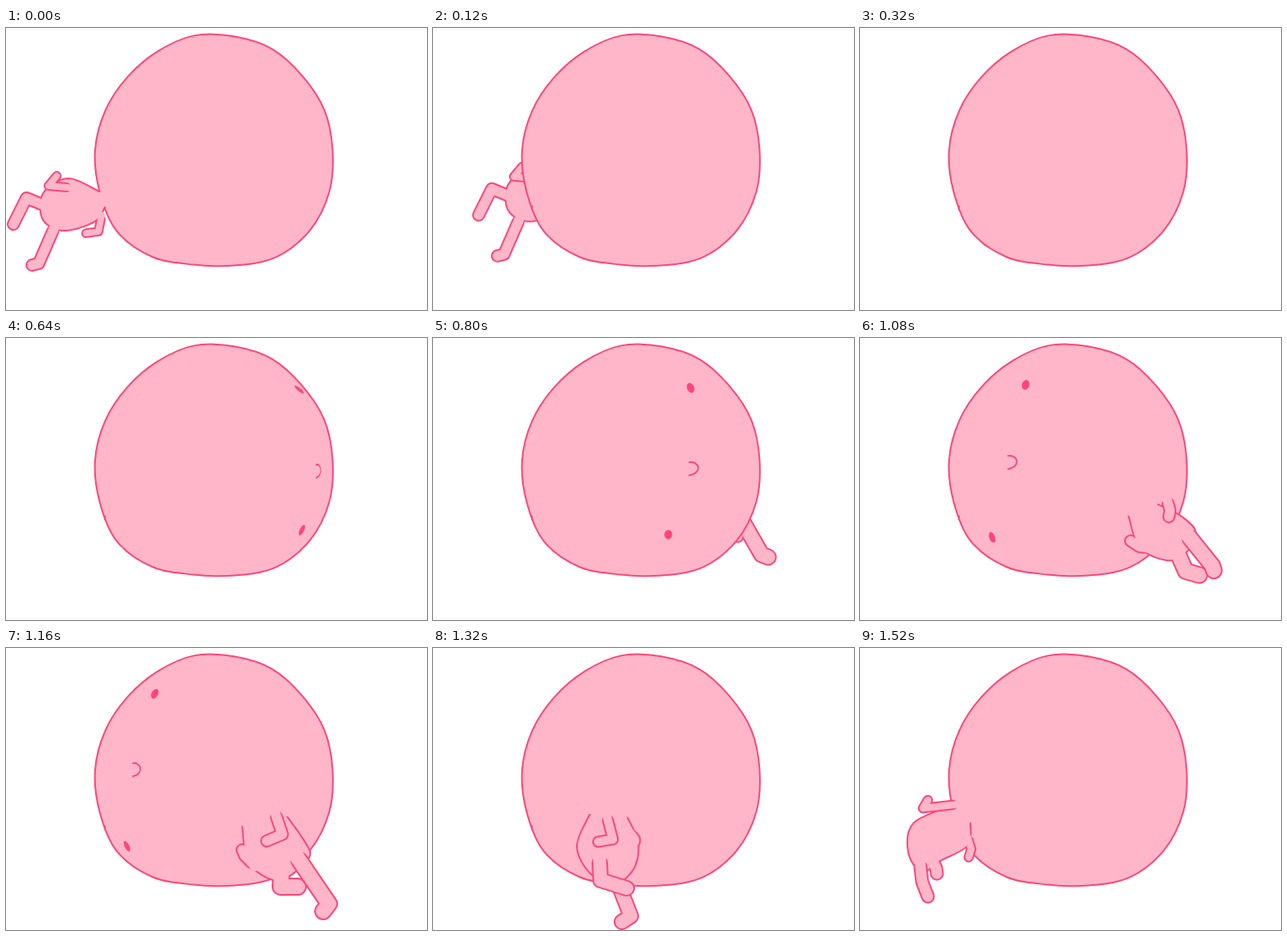
Animation, 515 px wide and 345 px high, one loop 1560 ms. Source, as an HTML page:

```html
<!DOCTYPE html>
<html lang="en">
<head>
<meta charset="utf-8">
<title>Round runner</title>
<style>
  html, body { margin: 0; width: 100%; height: 100%; overflow: hidden; background: #fff; }
  svg { display: block; width: 100vw; height: 100vh; }
  path { stroke-linecap: round; stroke-linejoin: round; }
  .ink { fill: none; stroke: #ff4678; stroke-width: 2; }
  .skin { fill: none; stroke: #ffb6c9; }
  .fill { fill: #ffb6c9; }
  .dot { fill: #ff4678; }
</style>
</head>
<body>
<svg viewBox="0 0 515 345">
  <defs><clipPath id="inside"><path id="clip"/></clipPath></defs>
  <g id="head">
    <path id="ball" class="ink fill"/>
    <path class="ink" d="M121,218V222"/>
    <g id="face" clip-path="url(#inside)">
      <ellipse id="eye1" class="dot"/>
      <ellipse id="eye2" class="dot"/>
      <path id="mouth" class="ink" d="M-5,-8C3,-9 8,-4 7,0C6,4 2,7 -5,8"/>
    </g>
  </g>
  <g id="body"></g>
</svg>
<script>
const LOOP = 1560, STEP = 40, CX = 254.5, CY = 149.2;
const $ = id => document.getElementById(id);
const parse = s => s.split(' ').map(p => p.split(',').map(Number));
const mix = (a, b, k) => Array.isArray(a) ? a.map((v, i) => mix(v, b[i], k)) : a + (b - a) * k;
const set = (el, attrs) => { for (const k in attrs) el.setAttribute(k, attrs[k]); };

// Value at time t from sorted [time, value] keys, carried on past both ends
function at(keys, t) {
  let i = 0;
  while (i < keys.length - 2 && t >= keys[i + 1][0]) i++;
  const [t0, a] = keys[i], [t1, b] = keys[i + 1];
  return mix(a, b, (t - t0) / (t1 - t0));
}

// Smooth curve through the points
function curve(pts, closed) {
  const n = pts.length;
  const get = i => closed ? pts[(i + n) % n] : pts[Math.min(n - 1, Math.max(0, i))];
  let d = 'M' + pts[0];
  for (let i = 0; i < (closed ? n : n - 1); i++) {
    const [p, a, b, q] = [get(i - 1), get(i), get(i + 1), get(i + 2)];
    d += 'C' + [a[0] + (b[0] - p[0]) / 6, a[1] + (b[1] - p[1]) / 6,
      b[0] - (q[0] - a[0]) / 6, b[1] - (q[1] - a[1]) / 6, ...b];
  }
  return d;
}

// Point moved a distance towards another one
function toward([x, y], [tx, ty], dist) {
  const r = Math.hypot(tx - x, ty - y) || 1;
  return [x + (tx - x) / r * dist, y + (ty - y) / r * dist];
}

// Ball: one radius every 20 degrees
const RADII = [145, 150, 153, 151.5, 143.5, 142.5, 151, 155, 149, 145.5, 141.5, 138.5, 139, 142, 141, 142.5, 141, 143.5];
const ball = curve(RADII.map((r, i) => {
  const a = i * Math.PI / 9;
  return [CX + r * Math.cos(a), CY + r * Math.sin(a)];
}), true);
set($('ball'), { d: ball });
set($('clip'), { d: ball });

// Face: each feature turns about the upright axis; keys are [degrees, y]
const turn = (...v) => [800, 960, 1160].map((t, i) => [t, v[i]]);
const EYE1 = turn([34.8, 61], [-8.3, 59], [-42.3, 56]);
const EYE2 = turn([16.7, 240.5], [-32.8, 246], [-64, 242.5]);
const MOUTH = turn([26, 160], [-9, 157], [-40.6, 149]);

function place(keys, radius, t) {
  const [deg, y] = at(keys, t), a = deg * Math.PI / 180;
  return { deg, y, x: 254 + radius * Math.sin(a), cos: Math.cos(a), sin: Math.sin(a) };
}

function drawEye(el, keys, radius, lean, t) {
  const p = place(keys, radius, t);
  set(el, {
    rx: 1 + 4 * Math.max(.2, p.cos), ry: 4.8 + 2.5 * Math.abs(p.sin),
    transform: `translate(${p.x} ${p.y}) rotate(${p.deg * lean})`
  });
}

function drawFace(t) {
  const facing = t >= 640 && t <= 1240;
  $('face').style.display = facing ? '' : 'none';
  if (!facing) return;
  drawEye($('eye1'), EYE1, 107, -.65, t);
  drawEye($('eye2'), EYE2, 118, .4, t);
  const m = place(MOUTH, 146, t);
  set($('mouth'), { transform: `translate(${m.x} ${m.y}) scale(${Math.max(.3, m.cos)} 1)` });
}

// Body: limb width, trunk outline from neck to neck, then limbs as root, bend and tip
const pose = (w, ...parts) => [w, ...parts.map(parse)];
const shift = ([w, ...parts], dx, dy) => [w, ...parts.map(p => p.map(([x, y]) => [x + dx, y + dy]))];

const trail = pose(14, '120,219 108,236 71,247 46,234 46,203 76,185 114,201',
  '74,195 52,193 62,181', '116,234 113,249 98,251', '57,249 40,288 32,290', '42,215 25,208 9,240');
const swing = pose(19, '396,200 435,191 470,212 477,237 454,255 412,248 389,217',
  '446,196 441,185 466,193', '417,247 416,257 394,250', '472,223 485,227 500,228', '464,241 492,275 502,287');
const stride = pose(20, '344,208 365,238 370,256 345,279 324,282 297,261 290,219',
  '331,207 338,228 319,236', '300,262 292,254 289,247', '359,260 395,313 388,322', '337,275 336,292 357,292');
const cross = pose(18, '237,208 250,238 245,269 222,288 193,275 177,243 192,205',
  '214,211 220,234 202,237', '244,230 247,234 247,237', '204,263 205,284 237,294', '228,292 242,328 231,335');
const hang = pose(15, '134,214 131,241 97,260 76,273 60,250 66,215 112,194',
  '113,192 77,196 83,186', '133,236 136,246 133,256', '74,268 76,286 83,304', '87,258 93,269 94,276');
const peek = shift(swing, -125, -8);
peek[3] = parse('366,236 370,241 373,243');
peek[5] = parse('374,216 402,265 410,268');

const RUN = [[0, trail], [320, shift(trail, 125, -30)], [640, shift(peek, -50, -50)], [800, peek],
  [960, swing], [1160, stride], [1320, cross], [1520, hang], [LOOP, trail]];

// Paths from back to front; the first group melts into one outline
const part = {};
for (const name of ['armB ink', 'legB ink', 'trunk ink', 'armB skin', 'legB skin', 'trunk fill',
  'legF ink', 'legF skin', 'armA ink', 'armA skin']) {
  const el = document.createElementNS('http://www.w3.org/2000/svg', 'path');
  set(el, { class: name.split(' ')[1] });
  part[name] = $('body').appendChild(el);
}
part['trunk ink'].style.strokeWidth = 4;

// Thick bent line; the skin reaches past the root so that end stays open
function drawLimb(name, [root, bend, tip], w) {
  const ink = part[name + ' ink'], skin = part[name + ' skin'];
  set(ink, { d: `M${root}L${bend}L${tip}` });
  set(skin, { d: `M${toward(root, bend, -w / 2)}L${root}L${bend}L${tip}` });
  ink.style.strokeWidth = w + 2;
  skin.style.strokeWidth = w - 2;
}

function drawBody([w, trunk, armA, armB, legF, legB]) {
  const line = curve(trunk), neck = p => toward(p, [CX, CY], 8);
  set(part['trunk ink'], { d: line });
  set(part['trunk fill'], { d: `${line}L${neck(trunk[trunk.length - 1])}L${neck(trunk[0])}Z` });
  drawLimb('armA', armA, w * .7);
  drawLimb('armB', armB, w * .7);
  drawLimb('legF', legF, w);
  drawLimb('legB', legB, w);
}

function draw(ms) {
  const t = Math.floor(ms % LOOP / STEP) * STEP;
  const body = $('body'), head = $('head'), behind = t > 0 && t < 960;
  head.parentNode.insertBefore(behind ? body : head, behind ? head : body);
  drawFace(t);
  drawBody(at(RUN, t));
}

const start = performance.now();
function tick() {
  draw(performance.now() - start);
  requestAnimationFrame(tick);
}
tick();
</script>
</body>
</html>
```
